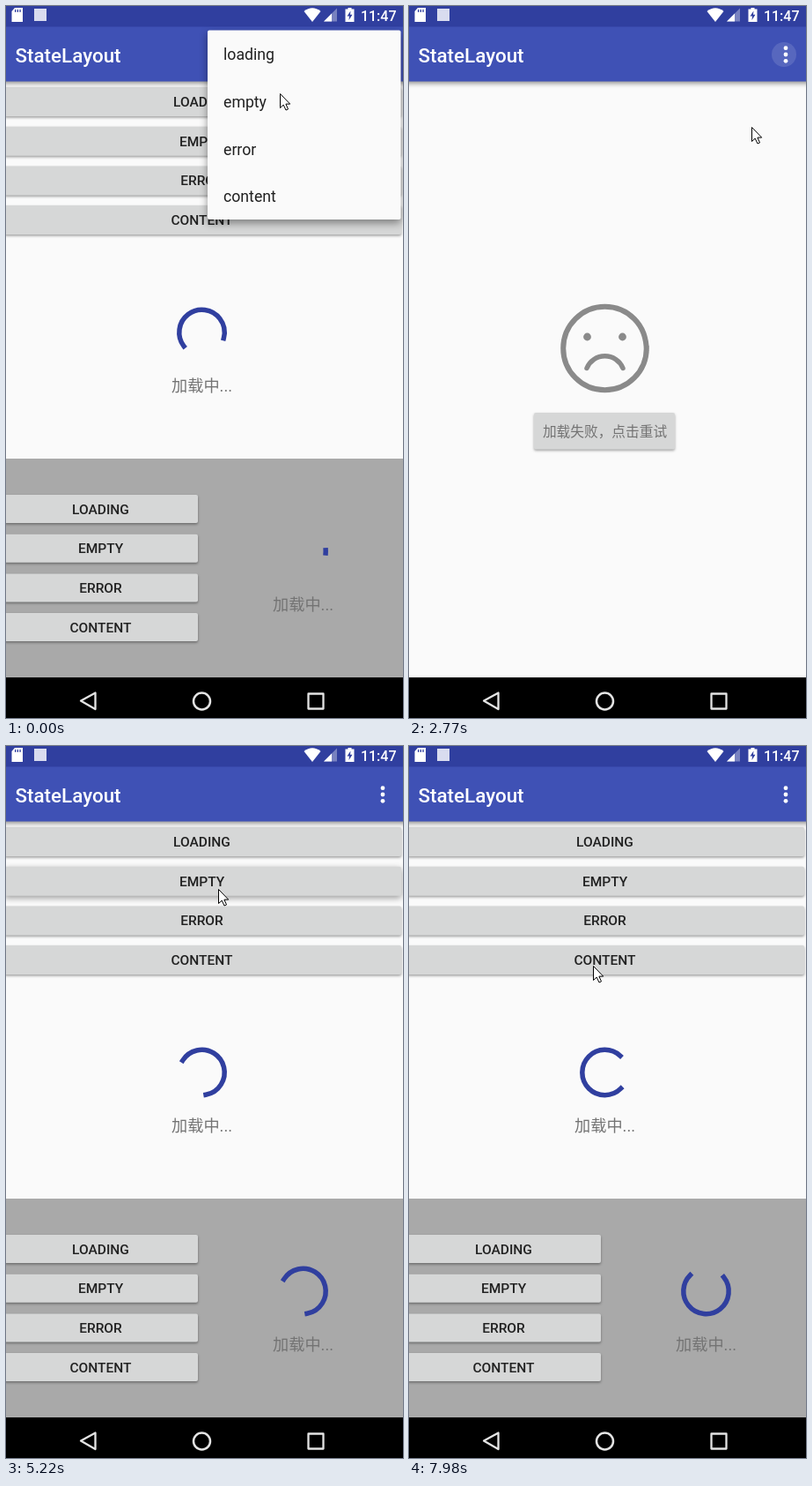
An HTML page with a canvas that plays this animation: 451 by 807 pixels, repeating every 8000 ms.

```html
<!DOCTYPE html>
<html lang="zh-CN">
<head>
<meta charset="utf-8">
<title>StateLayout</title>
<style>
  html, body { margin: 0; width: 100%; height: 100%; overflow: hidden; background: #fafafa; }
  canvas { display: block; }
</style>
</head>
<body>
<canvas id="stage" width="451" height="807"></canvas>
<script>
const W = 451, H = 807, LOOP = 8000, FADE = 325;
const FONT = 'Roboto, "Noto Sans CJK SC", "Noto Sans CJK", sans-serif';
const BLUE = '#303f9f', GREY = '#8a8a8a', TEXT = '#737373', PAGE = '#fafafa';
const LABELS = ['LOADING', 'EMPTY', 'ERROR', 'CONTENT'];
const CX = 222.5;

const screen = document.getElementById('stage').getContext('2d');
const layer = document.createElement('canvas');
layer.width = W;
layer.height = H;
layer.lang = 'zh-CN';
const layerCtx = layer.getContext('2d');
let g = screen;

const pageStates = [[-FADE, 'content'], [300, 'empty'], [2170, 'error'], [3543, 'content']];
const panelStates = [[-FADE, 'loading'], [5330, 'empty'], [5920, 'error'], [6500, 'content'], [7400, 'loading']];
const menus = [
  { open: -500, close: 300, row: 1 },
  { open: 1330, close: 2170, row: 2 },
  { open: 2860, close: 3543, row: 3 }
];
const cursorPath = [
  [0, 311, 99], [330, 311, 99], [820, 421, 58], [940, 424, 52], [1300, 424, 52],
  [1750, 330, 160], [2170, 330, 160], [2500, 424, 54], [2650, 424, 54],
  [2770, 389, 137], [3100, 375, 212], [3560, 375, 212], [3710, 381, 149],
  [4770, 245, 160], [5220, 241, 162], [5400, 241, 162], [5650, 238, 205],
  [5960, 238, 205], [6250, 232, 250], [6530, 232, 250], [6780, 235, 127],
  [7000, 235, 112], [7450, 235, 112], [7980, 209, 249]
];

const anchors = [0, 150, 820, 940, 1210, 2220, 2370, 2500, 2770, 3710, 3830, 4770, 4920, 5220, 5910, 6040, 6780, 7050, 7170, 7980];
const ticks = anchors.slice(1).flatMap((end, i) => {
  const start = anchors[i], n = Math.round((end - start) / 135);
  return Array.from({ length: n }, (_, k) => start + (end - start) * k / n);
}).concat(7980);
const holdTime = t => ticks.filter(s => s <= t).pop();

const clamp = v => Math.max(0, Math.min(1, v));
const ease = v => (1 - Math.cos(Math.PI * clamp(v))) / 2;
const mix = (a, b, p) => a + (b - a) * p;

// Timing curve from (0,0) to (1,1), solved by bisection.
function bezier(x1, y1, x2, y2, x) {
  const at = (a, b, s) => 3 * (1 - s) ** 2 * s * a + 3 * (1 - s) * s * s * b + s ** 3;
  let lo = 0, hi = 1;
  for (let i = 0; i < 24; i++) {
    const mid = (lo + hi) / 2;
    if (at(x1, x2, mid) < x) lo = mid; else hi = mid;
  }
  return at(y1, y2, lo);
}

function withAlpha(alpha, draw) {
  if (alpha <= 0) return;
  g = layerCtx;
  g.clearRect(0, 0, W, H);
  draw();
  g = screen;
  g.globalAlpha = alpha;
  g.drawImage(layer, 0, 0);
  g.globalAlpha = 1;
}

function text(str, x, y, size, color, align = 'center', weight = 400) {
  g.font = `${weight} ${size}px ${FONT}`;
  g.textAlign = align;
  g.fillStyle = color;
  g.fillText(str, x, y);
}

function rect(x, y, w, h, color) {
  g.fillStyle = color;
  g.fillRect(x, y, w, h);
}

function shape(points, color) {
  g.beginPath();
  points.forEach(([x, y]) => g.lineTo(x, y));
  g.closePath();
  g.fillStyle = color;
  g.fill();
}

function disc(x, y, r, color) {
  g.beginPath();
  g.arc(x, y, r, 0, 7);
  g.fillStyle = color;
  g.fill();
}

function strokePath(d, width, color, cap = 'butt') {
  g.lineWidth = width;
  g.strokeStyle = color;
  g.lineCap = cap;
  g.stroke(new Path2D(d));
}

function raised(x, y, w, h, color, blur, dy, alpha) {
  g.save();
  g.shadowColor = `rgba(0,0,0,${alpha})`;
  g.shadowBlur = blur;
  g.shadowOffsetY = dy;
  g.beginPath();
  g.roundRect(x, y, w, h, 2);
  g.fillStyle = color;
  g.fill();
  g.restore();
}

function button(label, x, y, w, h, cx, lift = 0) {
  raised(x, y, w, h, '#d6d7d7', 3 + 4 * lift, 1.5 + lift, 0.38);
  text(label, cx, y + h / 2 + 5.5, 15.5, '#212121', 'center', 500);
}

function spinner(x, y, ms) {
  const u = ms / 1333 % 1;
  const head = u < 0.5 ? bezier(0.4, 0, 0.2, 1, u * 2) : 1;
  const tail = u > 0.5 ? bezier(0.4, 0, 0.2, 1, u * 2 - 1) : 0;
  const base = -90 + ms * 720 / 4444 + 90 * u;
  const rad = Math.PI / 180;
  g.beginPath();
  g.arc(x, y, 25.7, (base + 270 * tail) * rad, (base + 270 * head + 0.1) * rad);
  g.lineWidth = 5.5;
  g.lineCap = 'square';
  g.strokeStyle = BLUE;
  g.stroke();
}

function spinnerAge(t, upper) {
  if (t < 3540) return (upper ? 5719 : 2733) + t * 1.025;
  if (upper && t > 7000) return Math.max(0, 588 + (t - 7980) * 1.025);
  return Math.max(0, 160 + (t - 3710) * 1.025);
}

function loadingView(x, y, age) {
  spinner(x, y, age);
  text('加载中...', x, y + 66.5, 18.2, TEXT);
}

function emptyView(dy) {
  g.save();
  g.translate(0, dy);
  g.lineJoin = 'round';
  strokePath('M195 359.5H250L264.5 390V424Q264.5 427.5 261 427.5H184.5Q181 427.5 181 424V390Z', 5, GREY);
  strokePath('M181 387.5H203.5V391Q203.5 403 215.5 403H230Q242 403 242 391V387.5H264', 4.5, GREY);
  text('暂无数据', CX, 465, 20, '#6e6e6e');
  g.restore();
}

function errorView(dy) {
  g.save();
  g.translate(0, dy);
  g.beginPath();
  g.arc(CX, 388, 47.3, 0, 7);
  g.lineWidth = 6;
  g.strokeStyle = GREY;
  g.stroke();
  disc(202.5, 375, 4.4, GREY);
  disc(242.5, 375, 4.4, GREY);
  strokePath('M202 410.5A22.2 22.2 0 0 1 243 410.5', 5.5, GREY, 'round');
  raised(142, 461, 160, 41.5, '#d6d7d7', 3, 1.5, 0.35);
  text('加载失败，点击重试', CX, 487.5, 15.7, TEXT);
  g.restore();
}

function customView() {
  text('我是一块自定义的Content，使用Statelayout', CX, 385, 22.4, TEXT);
  text('来切换状态', CX, 410.5, 22.4, TEXT);
}

function ripple(age, y) {
  const alpha = 0.07 * clamp(age / 80) * clamp((560 - age) / 160);
  if (age < 0 || alpha <= 0) return;
  const r = Math.min(225, age * 0.3);
  rect(0, y, 449, 33, `rgba(0,0,0,${alpha * 0.75})`);
  rect(230.5 - r, y, r * 2, 33, `rgba(0,0,0,${alpha * 0.6})`);
}

function upperButtons(t) {
  LABELS.forEach((label, i) => {
    const y = 92 + 44.7 * i;
    const hit = panelStates.slice(1).find(s => s[1] === label.toLowerCase());
    const since = t - hit[0];
    const lift = clamp((since + 170) / 60) * clamp((140 - since) / 80);
    button(label, -2, y, 451, 33, CX, lift);
    ripple(since + 60, y);
  });
}

function lowerPanel(t) {
  rect(0, 513, W, 248, '#a9a9a9');
  LABELS.forEach((label, i) => button(label, -2, 554 + 44.7 * i, 220, 32, 107.5));
  loadingView(337.5, 618, spinnerAge(t, false));
}

// Pairs of [name, opacity] for the view leaving and the view arriving.
function blend(states, t) {
  const i = states.findLastIndex(s => s[0] <= t);
  const p = ease((t - states[i][0]) / FADE);
  const views = [[states[i][1], p]];
  if (i && p < 1) views.unshift([states[i - 1][1], 1 - p]);
  return views;
}

function panelView(name, t) {
  if (name === 'loading') loadingView(CX, 370, spinnerAge(t, true));
  else if (name === 'empty') emptyView(-35);
  else if (name === 'error') errorView(-35);
  else customView();
}

function drawPage(t) {
  for (const [name, alpha] of blend(pageStates, t)) {
    if (name === 'empty') withAlpha(alpha, () => emptyView(0));
    else if (name === 'error') withAlpha(alpha, () => errorView(0));
    else {
      withAlpha(alpha, () => { upperButtons(t); lowerPanel(t); });
      for (const [inner, a] of blend(panelStates, t)) {
        withAlpha(alpha * a, () => panelView(inner, t));
      }
    }
  }
}

function statusBar() {
  rect(0, 0, W, 23.5, BLUE);
  shape([[10, 2], [19, 2], [19, 18], [6.5, 18], [6.5, 6]], '#fff');
  [10, 12.7, 15.4].forEach(x => rect(x, 4, 1.3, 3, BLUE));
  rect(32, 3, 14, 14, '#d9dcef');
  g.fillStyle = '#fff';
  g.fill(new Path2D('M348 18L338.5 6Q348 -1.5 357.5 6Z'));
  shape([[361, 17.5], [376, 2.5], [376, 17.5]], 'rgba(255,255,255,.35)');
  shape([[361, 17.5], [370, 8.5], [370, 17.5]], '#fff');
  rect(385.5, 3.5, 10, 14.5, '#fff');
  rect(388.5, 2, 4, 2, '#fff');
  shape([[391.5, 5.5], [387.5, 11.5], [390, 11.5], [389.5, 16], [393.5, 9.8], [391, 9.8]], BLUE);
  text('11:47', 443.5, 16.5, 16, '#fff', 'right', 500);
}

function toolbar(t) {
  g.save();
  g.shadowColor = 'rgba(0,0,0,.4)';
  g.shadowBlur = 5;
  g.shadowOffsetY = 2;
  rect(-10, 23, W + 20, 62.5, '#3f51b5');
  g.restore();
  statusBar();
  text('StateLayout', 10.5, 63.5, 22.4, '#fff', 'left', 500);
  for (const start of [1180, 2680]) {
    const glow = 0.13 * clamp((t - start) / 60) * clamp((start + 380 - t) / 150);
    disc(426, 55, 14, `rgba(255,255,255,${glow})`);
  }
  [47.7, 55, 62.3].forEach(y => disc(428, y, 2.4, '#fff'));
}

function navBar() {
  rect(0, 761, W, 46, '#000');
  g.lineJoin = 'round';
  strokePath('M85 787.5L101.5 778.5V797Z', 2.3, '#e4e4e4');
  strokePath('M213 788A9.5 9.5 0 1 1 232 788A9.5 9.5 0 1 1 213 788Z', 2.5, '#e4e4e4');
  strokePath('M343.5 779.5H360.5V796.5H343.5Z', 2.3, '#e4e4e4');
}

function drawMenu(t) {
  for (const { open, close, row } of menus) {
    const alpha = ease((t - open) / 220) * (1 - ease((t - close) / FADE));
    withAlpha(alpha, () => {
      raised(229, 27.5, 219.5, 214.5, PAGE, 10, 4, 0.42);
      const press = 0.09 * clamp((t - close + 120) / 100);
      rect(229, 28 + 53.6 * row, 219.5, 53.5, `rgba(0,0,0,${press})`);
      LABELS.forEach((s, i) => text(s.toLowerCase(), 247, 61.3 + 53.6 * i, 17.7, '#212121', 'left'));
    });
  }
}

function drawCursor(t) {
  const i = Math.max(1, cursorPath.findIndex(k => k[0] >= t));
  const [t0, x0, y0] = cursorPath[i - 1], [t1, x1, y1] = cursorPath[i];
  const p = ease((t - t0) / (t1 - t0));
  g.save();
  g.translate(Math.round(mix(x0, x1, p)) + 0.5, Math.round(mix(y0, y1, p)) + 0.5);
  const arrow = new Path2D('M0 0V16L3.7 12.6L6.5 18.5L9 17.4L6.4 11.6H11.2Z');
  g.fillStyle = '#fff';
  g.fill(arrow);
  g.lineWidth = 1;
  g.lineJoin = 'miter';
  g.strokeStyle = '#000';
  g.stroke(arrow);
  g.restore();
}

function render(t) {
  rect(0, 0, W, H, PAGE);
  drawPage(t);
  toolbar(t);
  navBar();
  drawMenu(t);
  drawCursor(t);
}

const begin = performance.now();
function frame() {
  render(holdTime((performance.now() - begin) % LOOP));
  requestAnimationFrame(frame);
}
frame();
</script>
</body>
</html>
```
